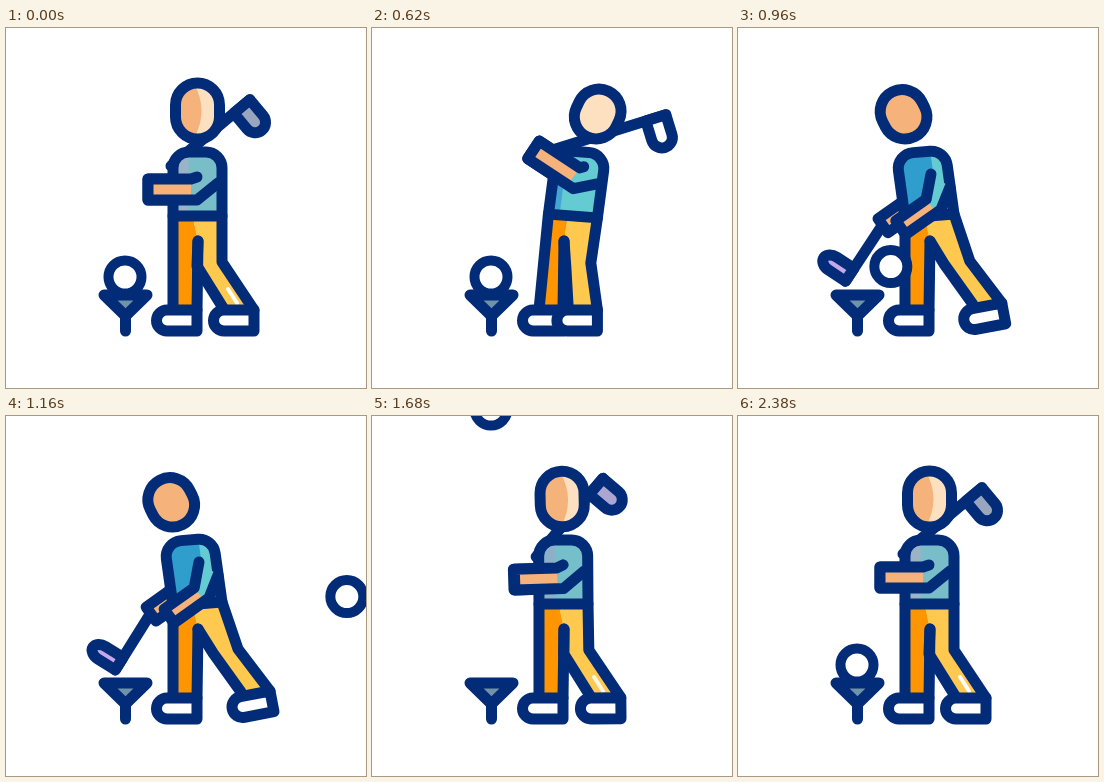
An HTML page with a canvas that plays this animation: 360 by 360 pixels, repeating every 2.4 s.

```html
<!DOCTYPE html>
<html lang="en">
<head>
<meta charset="utf-8">
<title>Golfer</title>
<style>
html, body { margin: 0; width: 100%; height: 100%; overflow: hidden; background: #fff; }
canvas { display: block; width: 360px; height: 360px; }
</style>
</head>
<body>
<canvas id="stage"></canvas>
<script>
const LOOP = 2400, INK = '#022b78', SKIN = '#f5b27a';
const canvas = document.getElementById('stage');
const ctx = canvas.getContext('2d');
const dpr = window.devicePixelRatio || 1;
canvas.width = canvas.height = 360 * dpr;

const clamp = (v, lo, hi) => Math.min(hi, Math.max(lo, v));
const ease = (t, from, to) => {
  const u = clamp((t - from) / (to - from), 0, 1);
  return u * u * (3 - 2 * u);
};
const mix = (a, b, k) => a.map((v, i) => v + (b[i] - v) * k);
const shift = ([x, y], dx, dy = 0) => [x + dx, y + dy];
const rgb = c => `rgb(${c.map(Math.round).join(',')})`;

// Swing amount: -1 backswing, 0 standing, 1 strike.
const swingAt = t => -ease(t, 0, 340) + 2 * ease(t, 580, 980) - ease(t, 1180, 1760);
// Shaft direction in radians; the club leads the body on the way down.
const clubAngle = t => (-40 + 38 * ease(t, 0, 320) - 236 * ease(t, 555, 980) +
  198 * ease(t, 1165, 1760)) * Math.PI / 180;
const blend = (w, back, stand, strike) => mix(stand, w < 0 ? back : strike, Math.abs(w));

function poly(pts, close) {
  const p = new Path2D();
  pts.forEach(([x, y], i) => i ? p.lineTo(x, y) : p.moveTo(x, y));
  if (close) p.closePath();
  return p;
}
function paint(path, fill, line = true) {
  if (fill) { ctx.fillStyle = fill; ctx.fill(path); }
  if (line) ctx.stroke(path);
}
function at([x, y], angle, draw) {
  ctx.save();
  ctx.translate(x, y);
  ctx.rotate(angle);
  draw();
  ctx.restore();
}
function inside(shape, draw) {
  ctx.save();
  ctx.clip(shape);
  draw();
  ctx.restore();
}

const foot = new Path2D('M0 0V21H-30A10.5 10.5 0 0 1-30 0Z');
const tee = new Path2D('M98 267H141L119.5 288ZM119.5 288V303');

function drawClub(t, w) {
  const grip = blend(w, [172, 124], [165, 138], [148, 192]);
  const a = clubAngle(t), reach = 103 - 30 * w ** 3;
  const tip = shift(grip, reach * Math.cos(a), reach * Math.sin(a));
  const r = 10.5 * (1 - .3 * Math.max(0, w) ** 8);
  const tint = blend(clamp(w * 8, -1, 1), [255, 255, 255], [154, 166, 190], [198, 168, 234]);
  paint(poly([grip, tip]));
  at(tip, a + Math.PI, () =>
    paint(new Path2D(`M0 0V-20.5A${r} 10.5 0 0 1 ${2 * r}-20.5V0Z`), rgb(tint)));
}

function drawHead(w, hip) {
  const lean = -.253 * w, h = 6 - 3 * Math.abs(w), e = 38 * w - 1;
  const shape = new Path2D(`M-22-${h}A22 22 0 0 1 22-${h}V${h}A22 22 0 0 1-22 ${h}Z`);
  at(shift(hip, 105 * Math.sin(lean), -105 * Math.cos(lean)), -.47 * w, () => {
    paint(shape, SKIN, false);
    inside(shape, () =>
      paint(new Path2D(`M${e - 4}-30Q${e + 14} 0 ${e - 4} 30H60V-30Z`), '#fce0c0', false));
    ctx.stroke(shape);
  });
}

function drawLegs(w, hipL, hipR) {
  const crotch = [192, 213], toe = [167, 282], heel = [191, 282];
  const knee = blend(w, [219, 235], [216, 234], [232, 233]);
  const ankle = blend(w, [224, 282], [248, 282], [264, 275]);
  const inner = [crotch, shift(knee, -25, 4), shift(ankle, -29, 1)];
  const seam = mix(hipL, hipR, .4);
  paint(poly([seam, hipR, knee, ankle, ...inner.slice().reverse()], true), '#ffc94f', false);
  paint(poly([hipL, seam, crotch, heel, toe], true), '#ff9500', false);

  ctx.save();
  ctx.globalAlpha = Math.max(0, 1 - Math.abs(w) * 3);
  ctx.lineWidth = 4;
  ctx.strokeStyle = '#fff';
  ctx.stroke(poly([[222, 261], [231, 275]]));
  ctx.restore();

  [[hipR, knee, ankle], inner, [hipL, toe], [crotch, heel]].forEach(l => paint(poly(l)));
  at(heel, 0, () => paint(foot, '#fff'));
  at(ankle, -.19 * Math.max(0, w), () => paint(foot, '#fff'));
}

function drawTorso(w, bl, br, teal) {
  const tl = shift(bl, -9 * w, -64), tr = shift(br, -9 * w, -64);
  const [split] = blend(w, [.22], [.32], [.7]);
  const blue = blend(clamp(w * 3, -1, 1), [69, 165, 210], [155, 179, 199], [47, 158, 204]);
  const shape = new Path2D();
  shape.moveTo(...bl);
  shape.arcTo(...tl, ...tr, 16);
  shape.arcTo(...tr, ...br, 16);
  shape.lineTo(...br);
  shape.closePath();
  paint(shape, teal, false);
  inside(shape, () =>
    paint(poly([bl, tl, mix(tl, tr, split), mix(bl, br, split)], true), rgb(blue), false));
  ctx.stroke(shape);
}

// Forearm outline from the inner elbow round the hand to the outer elbow.
function forearm(w, elbow) {
  const a = -.62 * w, c = Math.cos(a), s = Math.sin(a);
  const long = 49 - 6 * w, wide = 21 - 4 * Math.max(0, w);
  const local = (x, y) => shift(elbow, -x * c - -y * -s * -1, -x * s - y * c);
  return [local(6, wide), local(long, wide), local(long, 0), elbow];
}

function drawArm(w, elbow, teal) {
  const cap = blend(w, [213, 138], [191, 149], [193, 146]);
  const shoulder = blend(w, [226, 156], [212, 155], [212, 159]);
  const [a1, a0, b0, b1] = forearm(w, elbow);
  const outline = poly([cap, a1, a0, b0, b1, shoulder]);
  paint(outline, teal, false);
  paint(poly([a0, a1, mix(b0, b1, .88), b0], true), SKIN, false);
  ctx.stroke(outline);
}

function ballAt(t) {
  const fly = t - 925;
  if (fly < 0) return [119, 249];
  if (t < 1600) return [119 + fly * .94, 249 - fly * .29];
  return [119, -28 + 277 * ease(t, 1600, 2080)];
}

function draw(t) {
  const w = swingAt(t), up = Math.max(0, w);
  const hip = [191.5 + 10 * Math.max(0, -w), 188];
  const hipL = shift(hip, -24.5, 2 * w), hipR = shift(hip, 24.5, -2 * w);
  const elbow = blend(w, [202, 160], [191, 172], [203, 182]);
  const teal = rgb(mix([120, 189, 200], [100, 203, 210], clamp(Math.abs(w) * 3, 0, 1)));

  ctx.setTransform(dpr, 0, 0, dpr, 0, 0);
  ctx.fillStyle = '#fff';
  ctx.fillRect(0, 0, 360, 360);
  ctx.lineWidth = 11;
  ctx.lineCap = ctx.lineJoin = 'round';
  ctx.strokeStyle = INK;

  drawClub(t, w);
  paint(poly(forearm(w, shift(elbow, -18 * up, -2 * up))), SKIN);
  drawLegs(w, hipL, hipR);
  drawTorso(w, hipL, hipR, teal);
  drawArm(w, elbow, teal);
  drawHead(w, hip);
  paint(tee, '#6f93a8');

  const ball = new Path2D();
  ball.arc(...ballAt(t), 16.5, 0, Math.PI * 2);
  ctx.lineWidth = 10;
  paint(ball, '#fff');
}

const start = performance.now();
function tick() {
  draw((performance.now() - start) % LOOP);
  requestAnimationFrame(tick);
}
tick();
</script>
</body>
</html>
```
